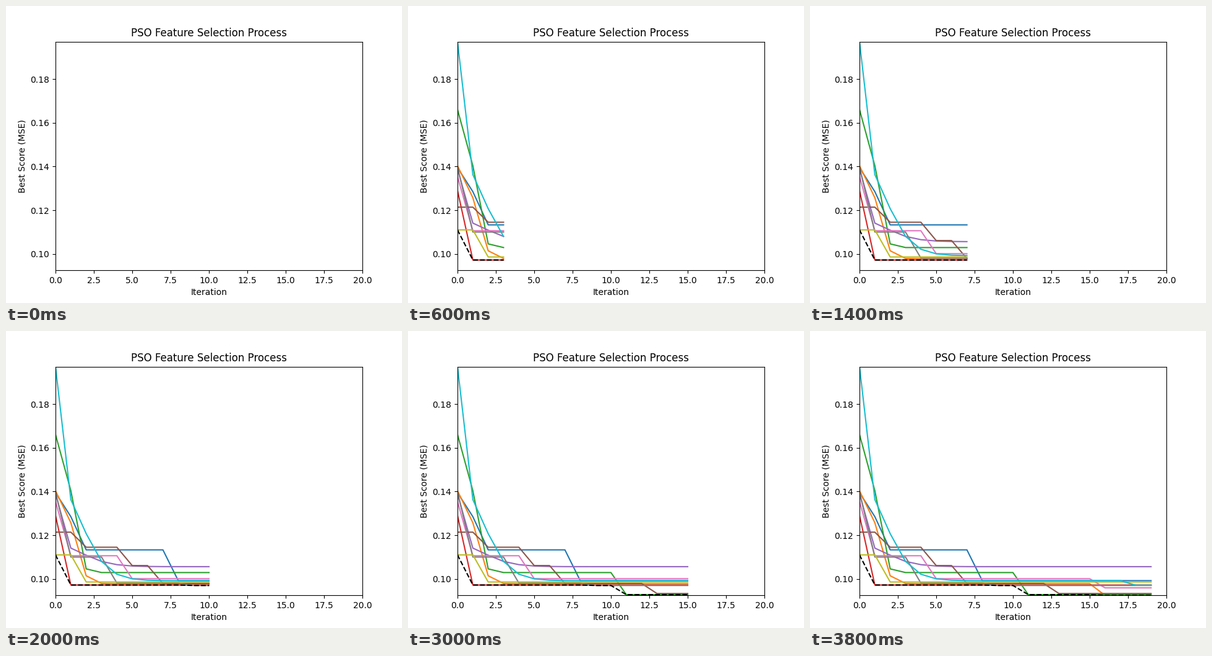
Recreate the animation shown at these times as a matplotlib script. Size 640 px wide and 480 px high, loop 4 s.

```python
import numpy as np
import matplotlib.pyplot as plt
from matplotlib.animation import FuncAnimation

STEPS = 20
Y_MIN, Y_MAX = 0.09248, 0.19718
iterations = np.arange(STEPS)


def descent(start, first, floor, rate=0.0, drops=()):
    """Jump to the first score, decay to a floor, then drop at late finds."""
    k = iterations[:-1].astype(float)
    settle = floor + (first - floor) * rate ** (k ** 1.4)
    scores = np.append(start, settle)
    for step, score in drops:
        scores[step:] = score
    return scores


particles = [
    descent(0.1395, 0.1285, 0.1133, drops=[(8, 0.0992)]),
    descent(0.1404, 0.1257, 0.0978, 0.13, drops=[(16, Y_MIN)]),
    descent(0.1661, 0.1404, 0.1029, 0.045, drops=[(11, 0.0928)]),
    descent(0.1290, 0.0972, 0.0972),
    descent(0.1389, 0.1141, 0.1056, 0.62),
    descent(0.1214, 0.1214, 0.1145,
            drops=[(5, 0.1061), (7, 0.0979), (13, 0.0933)]),
    descent(0.1354, 0.1106, 0.1106, drops=[(5, 0.1001), (16, 0.0959)]),
    descent(0.1399, 0.1100, 0.1100, drops=[(4, 0.0981), (9, 0.0970)]),
    descent(0.1110, 0.1110, 0.0986),
    descent(Y_MAX, 0.1363, 0.0992, 0.58, drops=[(18, 0.0971)]),
]
global_best = np.min(particles, axis=0)

fig, ax = plt.subplots(figsize=(6.4, 4.8), dpi=100)
ax.set_xlim(0, STEPS)
ax.set_ylim(Y_MIN, Y_MAX)
ax.set_title("PSO Feature Selection Process")
ax.set_xlabel("Iteration")
ax.set_ylabel("Best Score (MSE)")

lines = [ax.plot([], [], color=f"C{i}")[0] for i in range(len(particles))]
lines += ax.plot([], [], "k--")
series = [*particles, global_best]


def update(frame):
    n = frame + 1
    for line, scores in zip(lines, series):
        line.set_data(iterations[:n], scores[:n])
    return lines


anim = FuncAnimation(fig, update, frames=STEPS, interval=200,
                     repeat=True, repeat_delay=0)
plt.show()
```
